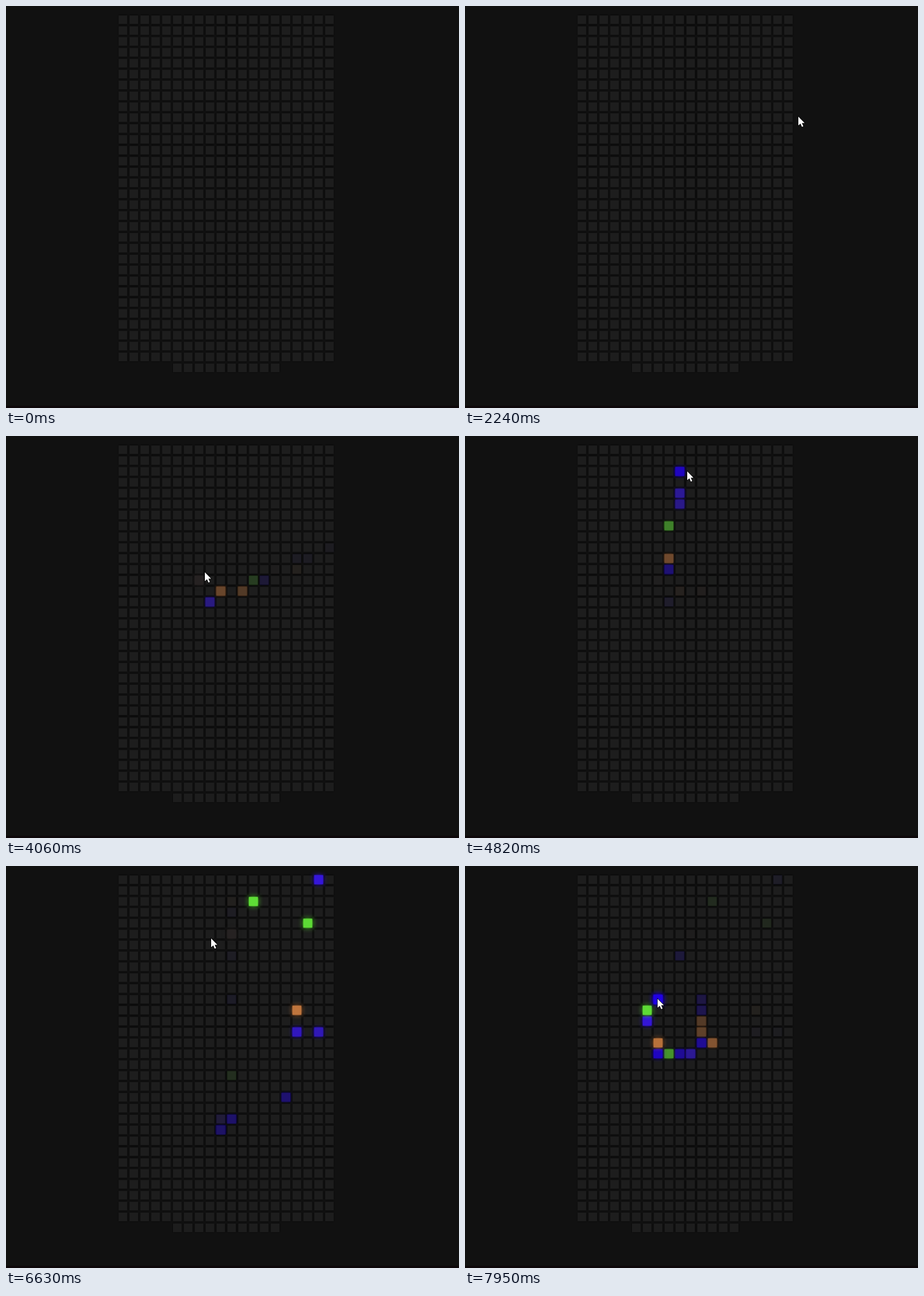
Recreate the animation shown at these times as an HTML page with a canvas. Size 795 px wide and 705 px high, loop 8000 ms.

```html
<!DOCTYPE html>
<html lang="en">
<head>
<meta charset="utf-8">
<title>Hover grid</title>
<style>
  html, body { margin: 0; width: 100%; height: 100%; overflow: hidden; background: #111; }
  canvas { display: block; }
</style>
</head>
<body>
<canvas id="stage" width="795" height="705"></canvas>
<script>
const W = 795, H = 705, LOOP = 8000;
const START = 530, STEP = 69.35;
const X0 = 205.2, Y0 = 24, PITCH = 19.08, SIZE = 15.3;
const FADE = 2000;
const BASE = [29, 29, 29], BLACK = [0, 0, 0];
const COLORS = {
  B: [32, 0, 228],
  V: [54, 22, 228],
  G: [95, 223, 54],
  O: [208, 126, 64],
  D: [38, 34, 34]
};

const ctx = document.getElementById('stage').getContext('2d');
const base = document.createElement('canvas');
base.width = W;
base.height = H;

const mix = (a, b, p) => a.map((v, i) => v + (b[i] - v) * p);
const rgba = (c, a = 1) => `rgba(${c.map(Math.round).join()},${a})`;

// CSS "ease", cubic-bezier(.25, .1, .25, 1)
function ease(x) {
  const bez = (s, a, b) => 3 * (1 - s) ** 2 * s * a + 3 * (1 - s) * s * s * b + s ** 3;
  let lo = 0, hi = 1;
  for (let i = 0; i < 18; i++) {
    const mid = (lo + hi) / 2;
    if (bez(mid, .25, .25) < x) lo = mid; else hi = mid;
  }
  return bez(lo, .1, 1);
}

// Pointer route: a point in time, or a run of points lighting one cell per letter
const route = [];
function go(t, x, y, lit = '', dt = 0, dx = 0, dy = 0) {
  for (let i = 0; i < Math.max(1, lit.length); i++) {
    route.push({ t: t + i * dt, x: x + i * dx, y: y + i * dy, color: COLORS[lit[i]] });
  }
}

// drift in beside the grid
go(530, 662, 6);
go(690, 603, 110);
go(950, 650, 236);
go(1290, 711, 190);
go(1770, 614, 190);
go(1970, 614, 190);
go(2264, 585, 194);

// sweep left
go(2380, 572, 195, 'B');
go(2440, 533, 214, 'B');
go(2500, 514, 216, 'B');
go(2520, 510, 229, 'O');
go(2580, 474, 233, 'D');
go(2720, 456, 246, 'B');
go(2900, 436, 250, 'G');
go(2980, 422, 260);
go(3026, 414, 262);
go(3090, 415, 267, 'O');
go(3240, 396, 270);
go(3320, 380, 275, 'O');
go(3400, 354, 285, 'V');
go(3480, 349, 285);
go(3640, 349, 285);

// up
go(3930, 343, 250, 'D');
go(4066, 349, 239);
go(4100, 353, 233, 'B');
go(4170, 353, 214, 'O');
go(4200, 355, 157, 'G');
go(4260, 373, 119, 'VV', 20, 0, -19);
go(4340, 374, 65, 'B');
go(4530, 386, 62);
go(4800, 386, 62);

// down
go(4860, 394, 62, 'O');
go(5060, 391, 81, 'VGV', 15, 0, 38);
go(5110, 390, 233, 'B');
go(5180, 389, 300, 'D');
go(5280, 389, 367, 'G');
go(5340, 388, 386, 'D');
go(5430, 378, 443, 'V');
go(5510, 377, 466, 'B');
go(5860, 377, 466, 'B');

// wide loop to the right and over the top
go(5890, 392, 445, 'B');
go(5915, 485, 407, 'B');
go(5950, 600, 380);
go(6100, 749, 330);
go(6250, 548, 291, 'V');
go(6290, 512, 288, 'V');
go(6320, 510, 252, 'O');
go(6430, 546, 18, 'V');
go(6500, 530, 100, 'G');
go(6545, 436, 62, 'G');
go(6600, 398, 121, 'D');
go(6632, 360, 127);

// circle round the middle
go(6780, 374, 157, 'B');
go(6840, 413, 233, 'BBOO', 95, 0, 19);
go(7220, 430, 307, 'O');
go(7430, 417, 314, 'B');
go(7450, 396, 329, 'VBGB', 5, -19, 0);
go(7660, 335, 308, 'O');
go(7700, 322, 272, 'V');
go(7790, 322, 250, 'G');
go(7880, 336, 237, 'B');
go(7950, 338, 233, 'B');

function square(g, col, row, fill, glow, blur) {
  g.fillStyle = fill;
  g.shadowColor = glow;
  g.shadowBlur = blur;
  g.fillRect(X0 + col * PITCH - SIZE / 2, Y0 + row * PITCH - SIZE / 2, SIZE, SIZE);
  g.shadowBlur = 0;
}

function drawBase() {
  const g = base.getContext('2d');
  g.fillStyle = '#111';
  g.fillRect(0, 0, W, H);
  for (let i = 0; i < 650; i++) {
    const row = Math.floor(i / 20);
    square(g, i % 20 + (row === 32 ? 5 : 0), row, rgba(BASE), '#000', 2);
  }
  g.fillStyle = '#0d080a';
  g.fillRect(0, 701, W, 4);
}

function drawCell(p, left, now) {
  const age = Math.max(0, now - left) / FADE;
  if (age >= 1) return;
  const k = ease(age);
  const col = Math.round((p.x - X0) / PITCH), row = Math.round((p.y - Y0) / PITCH);
  const fill = rgba(mix(p.color, BASE, k));
  square(ctx, col, row, fill, rgba(p.color, 1 - k), 9.5 * (1 - k));
  square(ctx, col, row, fill, rgba(mix(p.color, BLACK, k)), 2);
}

const arrow = new Path2D('M0 0V15.6L3.8 12.3L6.3 18L8.8 16.9L6.3 11.3H11Z');

function drawPointer(now) {
  let i = route.findIndex(p => p.t > now);
  if (i < 0) i = route.length;
  const a = route[i - 1], b = route[i] || a;
  const k = a === b ? 0 : (now - a.t) / (b.t - a.t);
  ctx.save();
  ctx.translate(Math.round(a.x + (b.x - a.x) * k), Math.round(a.y + (b.y - a.y) * k));
  ctx.strokeStyle = '#000';
  ctx.lineWidth = 1.4;
  ctx.stroke(arrow);
  ctx.fillStyle = '#fff';
  ctx.fill(arrow);
  ctx.restore();
}

function draw(t) {
  ctx.drawImage(base, 0, 0);
  if (t < START) return;
  // the picture advances in even steps
  const now = START + STEP * Math.floor((t - START + 25) / STEP);
  route.forEach((p, i) => {
    if (p.color && p.t <= now) drawCell(p, i + 1 < route.length ? route[i + 1].t : LOOP, now);
  });
  drawPointer(now);
}

const begin = performance.now();
function tick() {
  draw((performance.now() - begin) % LOOP);
  requestAnimationFrame(tick);
}

drawBase();
tick();
</script>
</body>
</html>
```
